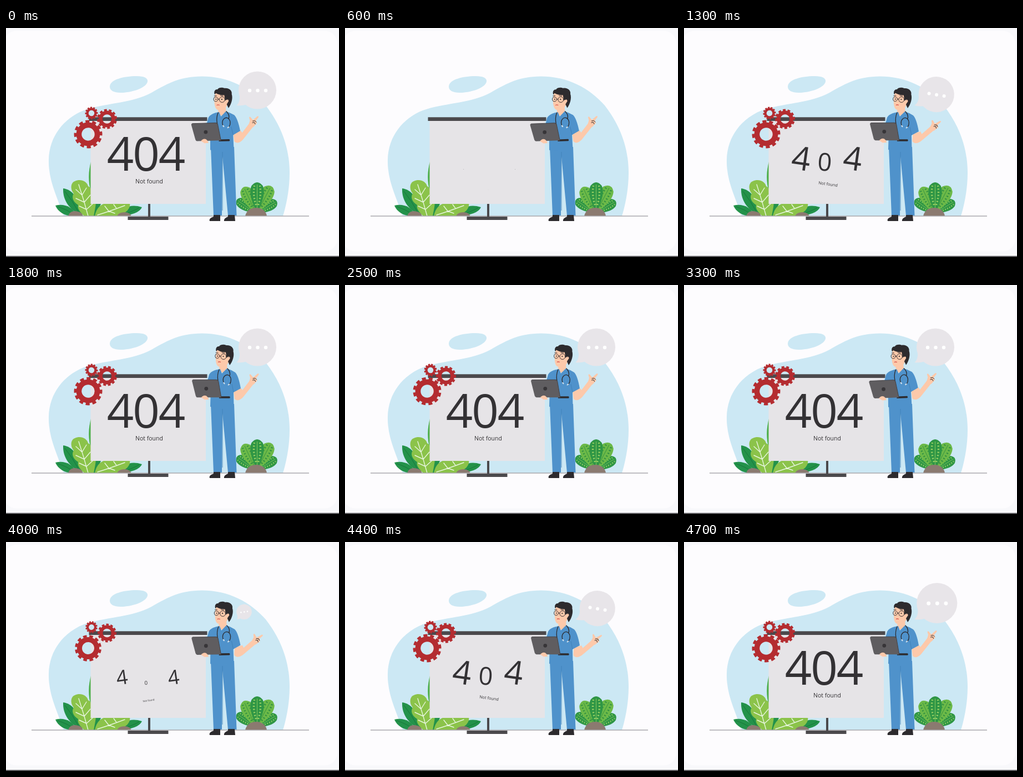
Recreate the animation shown at these times as an HTML page. Size 600 px wide and 414 px high, loop 4800 ms.

```html
<!DOCTYPE html>
<html lang="en">
<head>
<meta charset="utf-8">
<title>404 Not found</title>
<style>
  html, body { margin: 0; width: 100%; height: 100%; overflow: hidden; background: #f8f8fb; }
  svg { display: block; width: 600px; height: 414px; }
  text { font-family: "Open Sans", "Noto Sans", sans-serif; fill: #333134; text-anchor: middle; }
  .digit { font-size: 85px; }
  .note { font-size: 10.5px; font-weight: 500; }
  .skin { fill: #fdc9aa; }
  .ink { fill: #2d2b2e; }
  .metal { fill: #4b494c; }
  .rock { fill: #8b7a70; }
  .line { fill: none; stroke: #2d2b2e; stroke-linecap: round; stroke-linejoin: round; }
  .vein { fill: none; stroke: #e6f5dc; stroke-width: 1.4; stroke-linecap: round; }
  .gear { fill: none; stroke: #b42c30; }
  .dark { fill: #2f9645; stroke: #9ad163; }
  .light { fill: #6cb948; stroke: #2f8f42; }
</style>
</head>
<body>
<svg viewBox="0 0 600 414">
  <defs>
    <g id="leaf">
      <path d="M0 0C-6 -16 -17 -36 -10 -51Q0 -63 10 -51C17 -36 6 -16 0 0Z" stroke="none"/>
      <path d="M0 -4V-53" stroke-width=".8"/>
      <path d="M-2 -16Q-8 -34 -5 -51M2 -16Q8 -34 5 -51" fill="none" stroke-width="3.4" stroke-dasharray="2 3.6"/>
    </g>
  </defs>

  <rect x="-4" y="5" width="601" height="399" rx="23" fill="#fdfcfe"/>
  <rect y="412" width="600" height="2" fill="#5c5b5e"/>

  <g fill="#cce8f4">
    <path d="M104 340C92 305 76 275 77 238C78 195 105 163 140 149C180 135 225 137 262 117C295 98 315 88 352 87.5C400 87 440 108 468 140C495 175 511 215 511 262C511 292 505 320 499 340Z"/>
    <path d="M187 106C187 93 213 87 235 87C250 87 256 91 255 97C253 108 227 117 207 117C194 117 187 113 187 106Z"/>
  </g>

  <!-- left plants -->
  <g fill="#23924a">
    <path d="M154 238Q145 268 153 296L162 300V240Z" fill="#4bae48"/>
    <path d="M89 321C103 317 120 322 127 339C110 342 95 335 89 321Z"/>
    <path d="M103 290C120 292 132 308 138 340C115 330 102 312 103 290Z"/>
    <path d="M203 340Q215 315 245 324Q239 338 203 340Z"/>
    <path d="M150 300L171 318L162 340H148Z"/>
  </g>
  <g fill="#8bc34a">
    <path d="M141 340C134 333 128 327 130 320C120 314 118 305 122 299C115 291 117 279 124 277C134 272 146 277 148 286C154 289 156 296 155 301C163 307 162 320 161 324L158 340Z"/>
    <path d="M160 340Q164 318 184 316H223Q226 331 201 340Z"/>
  </g>
  <path class="vein" d="M131 283Q140 310 148 340M137 302L126 292M137 302L145 289M141 315L126 308M141 315L152 302M145 328L132 322M145 328L157 317M165 338Q185 332 214 321M185 331L178 322M185 331L196 335M199 326L194 319"/>
  <path d="M93 323Q110 328 123 338M106 295Q120 312 132 335M207 338Q226 333 240 325" fill="none" stroke="#166f36" stroke-width=".8"/>
  <path class="rock" d="M112 340Q114 331 125 331Q137 332 139 340ZM200 340Q203 333 214 333Q224 334 226 340Z"/>

  <!-- right plant -->
  <g transform="translate(451 336)">
    <use href="#leaf" class="dark" transform="rotate(-54) scale(.76)"/>
    <use href="#leaf" class="dark" transform="rotate(58) scale(.76)"/>
    <use href="#leaf" class="light" transform="rotate(-25) scale(.94)"/>
    <use href="#leaf" class="light" transform="rotate(28)"/>
    <use href="#leaf" class="dark" transform="translate(1.5 0)"/>
  </g>
  <path class="rock" d="M431 340C433 330 441 325 451 325C462 325 469 332 470 340Z"/>
  <path d="M46 340H546" stroke="#aaa8ac" stroke-width="1.4"/>

  <!-- board -->
  <g class="metal">
    <rect x="256" y="317" width="4" height="25"/>
    <rect x="219.5" y="341" width="73" height="6"/>
    <rect x="152.5" y="167" width="207.5" height="151" fill="#e6e4e7"/>
    <rect x="149.5" y="161.3" width="213" height="6.7"/>
  </g>
  <g id="four1"><text class="digit" x="206" y="258">4</text></g>
  <g id="zero"><text class="digit" x="252.5" y="258">0</text></g>
  <g id="four2"><text class="digit" x="299" y="258">4</text></g>
  <g id="note"><text class="note" x="258" y="281">Not found</text></g>
  <g id="gears"></g>

  <!-- bubble -->
  <g id="bubble" fill="#e8e5e9">
    <circle cx="453" cy="112.5" r="34"/>
    <path d="M421 122Q422 134 415.5 140Q425 141 435 138Z"/>
    <path d="M439 113H468.100" stroke="#fff" stroke-width="6.4" stroke-linecap="round" stroke-dasharray="0 14.5"/>
  </g>

  <!-- person -->
  <path d="M369 215L374 339H389L390 232L400 339H415.5L411 215Z" fill="#4f92cb"/>
  <path d="M390 224V330" stroke="#3f80b8" stroke-width=".8"/>
  <path class="ink" d="M374 338H386V349H367Q365 344 374 341ZM400 338H412L413 349H393Q392 344 400 341Z"/>
  <g id="upper">
    <g id="arm">
      <path class="skin" d="M410 192L423 186L426 190L439 173L446 179L427 203Q418 212 412 206Z"/>
      <path class="skin" d="M438 175L440 168L438.5 162.5Q440 160 442 163L445.5 167L453 160.5Q456 159 455.5 162L451 168L452.5 173L446 180Z"/>
      <path class="line" stroke-width="1" d="M445 169L449 168.5L451.5 171M444.5 172L448 171.5L449.5 174.5"/>
    </g>
    <path class="skin" d="M385 143L398 139L399 156Q390 162 384 154Z"/>
    <path d="M386 152C377 153 369 156 366 162L361 180L369 185L368 220Q389 223 410.5 220L410 194L423 187Q419 164 413 158Q405 153 398 151L389 160Z" fill="#4f92cb"/>
    <path d="M410 194L407 179" stroke="#3f80b8" stroke-width=".9"/>
    <path class="line" stroke="#26384c" stroke-width="1.3" d="M384 153Q380 162 382 173M399 151Q405 157 403 164M392 176C389 166 396 161 401 163C407 167 406 175 403 179"/>
    <path d="M392 176L394 179M403 179L400 181" stroke="#d9e5ee" stroke-width="2"/>
    <path class="skin" d="M380 117C377 130 377 143 382 147C389 151 400 146 402 137L405 125L397 114Z"/>
    <path class="ink" d="M379 120C377 116 379 110 384 111C386 107 393 107 397 109C405 108 411 114 409.500 120C412 128 408 139 403 145L400 138C403 135 404 130 400 129L397.500 132L396 121.500C391 122 385 120 381 117.500Z"/>
    <circle class="skin" cx="401" cy="132" r="2.6"/>
    <g class="line" stroke-width=".9">
      <circle cx="380.7" cy="128.500" r="4"/>
      <circle cx="392" cy="129.500" r="5"/>
      <path d="M384.700 128.500H387M397 129L401 130M378 122.500L382 122M389 122L394 123"/>
    </g>
    <circle class="ink" cx="381" cy="128.500" r="1"/><circle class="ink" cx="391.500" cy="129" r="1.1"/>
    <path d="M382 139.500Q384 138 387 139.500" fill="none" stroke="#d95c55" stroke-width="1.300"/>
    <g transform="translate(.8 .3)">
      <path class="ink" d="M384 201H402Q404 203 402 204.500H383Z"/>
      <path d="M336 171H378Q381 171 382 174L387 203H344Q342 203 341 200L334.500 174Q334 171 336 171Z" fill="#5f5d60"/>
      <path d="M336 171H378Q381 171 382 174L387 203" fill="none" stroke="#454346"/>
      <circle cx="360" cy="187" r="3.400" fill="#373538"/>
      <path class="skin" d="M351 203Q355 198 360 200L364 204V207H357Z"/>
    </g>
  </g>
</svg>
<script>
  const LOOP = 4800, CYCLE = 3100, START = 600, STEP = 100, GROW = 1000;
  const $ = id => document.getElementById(id);
  const clamp = (v, lo = 0, hi = 1) => Math.min(hi, Math.max(lo, v));
  const wave = u => Math.sin(2 * Math.PI * u);

  // Scale rules, by entrance progress u (may run past 1).
  const surge = u => clamp(Math.max(.02, u) + .13 * Math.max(0, wave(clamp(u))));
  const late = u => clamp(u) ** 1.8;
  const overshoot = u => Math.min(1.35 * u, Math.max(1, 1.575 - u / 2));

  const pops = [
    { id: 'bubble', x: 416, y: 139.5, scale: overshoot, swing: 10 },
    { id: 'four1', x: 214, y: 256, scale: surge, swing: 8.5 },
    { id: 'zero', x: 252.5, y: 258, scale: late, swing: 4 },
    { id: 'four2', x: 307, y: 256, scale: surge, swing: 8.5 },
    { id: 'note', x: 258, y: 293, scale: surge, swing: 8.5 }
  ];

  function addGear(x, y, outer, spin) {
    const el = document.createElementNS('http://www.w3.org/2000/svg', 'g');
    const root = outer * .84, hole = outer * .46, teeth = 12;
    const ring = (a, b, extra = '') =>
      `<circle class="gear" r="${(a + b) / 2}" stroke-width="${b - a}" ${extra}/>`;
    el.innerHTML = ring(hole, root)
      + ring(root - .5, outer, `pathLength="${teeth}" stroke-dasharray=".58 .42"`);
    $('gears').append(el);
    return { el, x, y, spin };
  }
  const gears = [addGear(154, 154, 11.5, 60), addGear(182, 164.5, 18, -60), addGear(148, 192, 25.5, 60)];

  function draw(now) {
    const t = Math.floor(now % LOOP / STEP) * STEP;
    const c = (t - START + CYCLE) % CYCLE;
    const u = c / GROW, turn = -wave(clamp(u));
    for (const { id, x, y, scale, swing } of pops) {
      $(id).setAttribute('transform',
        `translate(${x} ${y}) rotate(${swing * turn}) scale(${scale(u)}) translate(${-x} ${-y})`);
    }
    for (const { el, x, y, spin } of gears) {
      el.setAttribute('transform',
        `translate(${x} ${y}) rotate(${spin * c / CYCLE}) scale(${clamp(c / 320)})`);
    }
    const lean = -2.4 * Math.cos(Math.PI * (c + 250) / CYCLE) ** 6;
    const reach = 14 * Math.sin(Math.PI * clamp(u));
    $('upper').setAttribute('transform', `rotate(${lean} 389 220)`);
    $('arm').setAttribute('transform', `rotate(${reach - lean} 418 203)`);
    requestAnimationFrame(draw);
  }
  requestAnimationFrame(draw);
</script>
</body>
</html>
```
